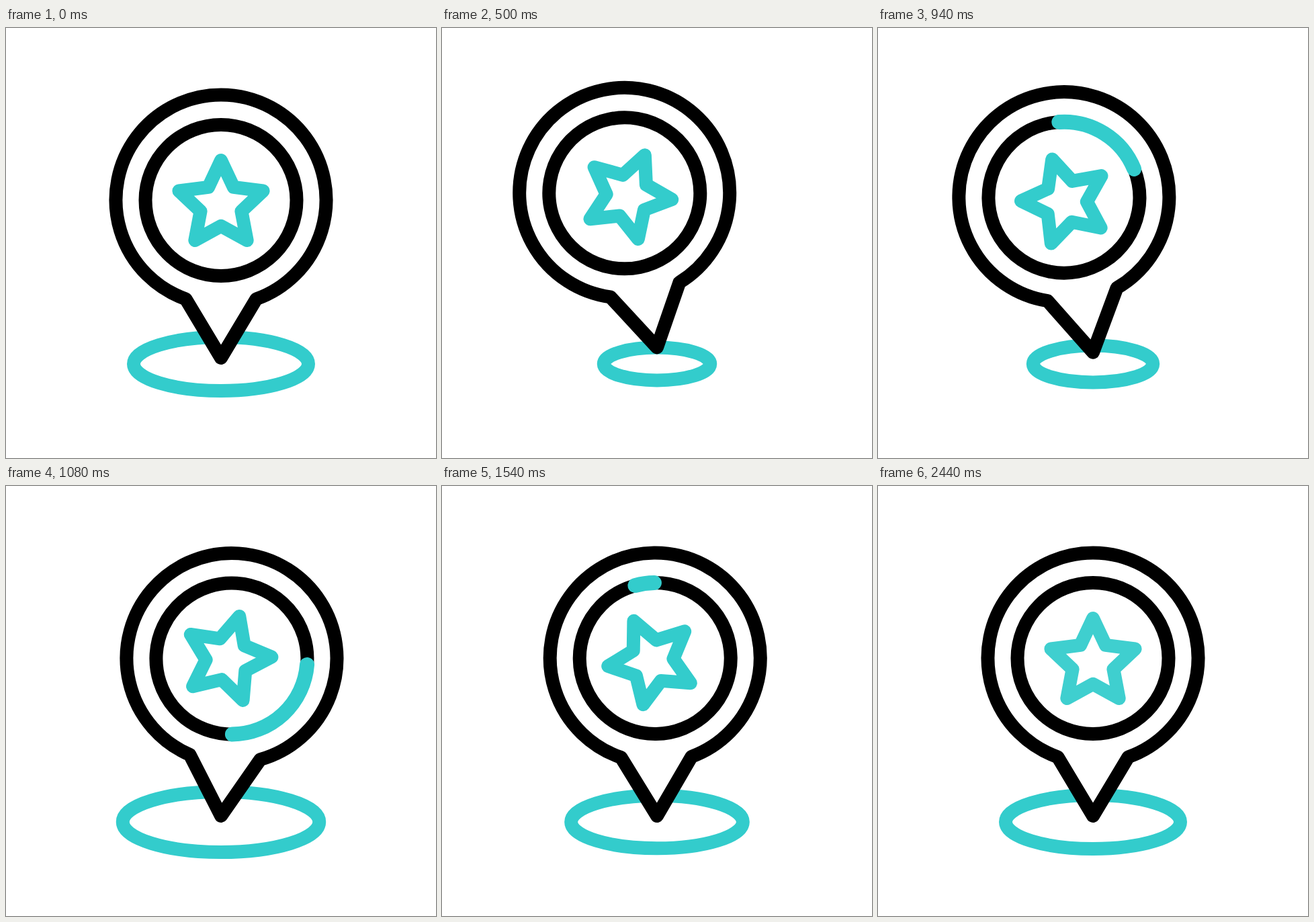
An HTML page that plays this animation: 640x640 px, repeating every 3.6 s.

```html
<!DOCTYPE html>
<html lang="en">
<head>
<meta charset="utf-8">
<title>Map pin</title>
<style>
  html, body { margin: 0; width: 100%; height: 100%; overflow: hidden; background: #fff; }
  svg { display: block; width: 100%; height: 100%; }
</style>
</head>
<body>
<svg viewBox="0 0 640 640" fill="none" stroke="#000" stroke-width="20" stroke-linecap="round" stroke-linejoin="round">
  <ellipse id="ground" cx="320" cy="500" stroke="#33cccc"/>
  <!-- the pin's own origin is its tip -->
  <g id="pin">
    <path d="M-52.5 -87.6A156.5 156.5 0 1 1 52.5 -87.6L0 0Z" fill="#fff"/>
    <g transform="translate(0 -234.5)">
      <circle r="112.5"/>
      <path id="arc" stroke="#33cccc" stroke-width="22"/>
      <path id="star"/>
    </g>
  </g>
  <path id="sparks"/>
</svg>
<script>
const LOOP = 3600, STEP = 20, RING = 112.5;
const el = id => document.getElementById(id);
const ground = el('ground'), pin = el('pin'), arc = el('arc'), star = el('star'), sparks = el('sparks');

const smooth = u => u * u * (3 - 2 * u);
const easeIn = power => u => u ** power;
const sineOut = u => Math.sin(u * Math.PI / 2);
const earlySmooth = u => smooth(u ** 0.74);

// Eased run from one value to another between two times.
function run(t, t0, t1, from, to, ease = smooth) {
  const u = Math.min(1, Math.max(0, (t - t0) / (t1 - t0)));
  return from + (to - from) * ease(u);
}

// Swings through [time, value] turning points; only the first leg has its own easing.
function swing(t, rest, firstEase, ...turns) {
  let value = rest, time = 0, ease = firstEase;
  for (const [nextTime, next] of turns) {
    if (t < nextTime) return run(t, time, nextTime, value, next, ease);
    [time, value, ease] = [nextTime, next, smooth];
  }
  return value;
}

const tilt = t => swing(t, 0, smooth, [840, -18.5], [1090, 4], [1335, -3.5], [1620, 0]);
const lift = t => swing(t, 0, easeIn(3), [672, 38], [1056, 0]);
const spread = t => swing(t, 1, easeIn(1.75), [780, 0.15], [1080, 1.125], [1310, 0.9], [1620, 1]);
const spin = t => swing(t, 0, sineOut, [795, -45], [1618, 420], [1910, 320.5], [2155, 372.5], [2440, 360]);

const polar = (r, deg) => {
  const a = deg * Math.PI / 180;
  return (r * Math.sin(a)).toFixed(2) + ' ' + (-r * Math.cos(a)).toFixed(2);
};

function starPath() {
  const corners = Array.from({ length: 10 }, (_, i) => polar(i % 2 ? 32 : 65.8, i * 36));
  return 'M' + corners.join('L') + 'Z';
}

function arcPath(t) {
  const head = run(t, 718, 1454, 0, 360);
  const tail = run(t, 915, 1660, 0, 360, earlySmooth);
  if (head <= 0 || tail >= 360) return '';
  const large = head - tail > 180 ? 1 : 0;
  return `M${polar(RING, tail)}A${RING} ${RING} 0 ${large} 1 ${polar(RING, head)}`;
}

function sparkPath(t) {
  const head = run(t, 1167, 1367, 0, 1), tail = run(t, 1200, 1400, 0, 1);
  if (head <= 0 || tail >= 1) return '';
  const at = (side, p) => `${320 + side * (35 + 50 * p)} ${485 - 33 * p}`;
  return [-1, 1].map(side => `M${at(side, tail)}L${at(side, head)}`).join('');
}

function draw(t) {
  const size = spread(t);
  ground.setAttribute('rx', 130 * size);
  ground.setAttribute('ry', 40 * size);
  pin.setAttribute('transform', `translate(320 ${491 - lift(t)}) rotate(${tilt(t)})`);
  star.setAttribute('transform', `rotate(${spin(t)}) translate(0 6.3)`);
  star.setAttribute('stroke', t >= 1640 ? '#3fcfcf' : '#33cccc');
  arc.setAttribute('d', arcPath(t));
  sparks.setAttribute('d', sparkPath(t));
}

star.setAttribute('d', starPath());
const start = performance.now();
function frame() {
  const t = (performance.now() - start) % LOOP;
  draw(Math.floor(t / STEP) * STEP);
  requestAnimationFrame(frame);
}
frame();
</script>
</body>
</html>
```
